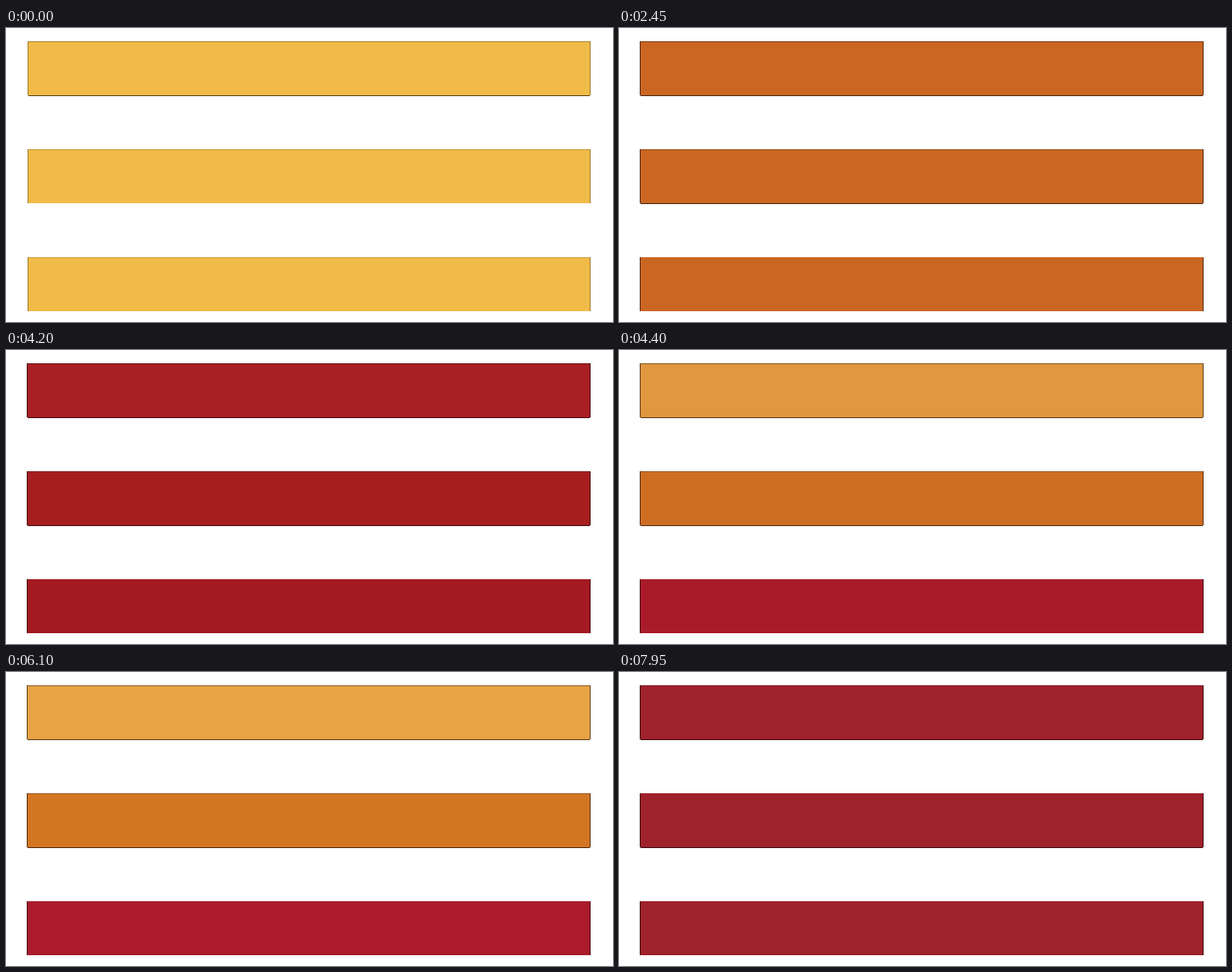
Animation of 731 by 354 pixels, one loop 8000 ms. Source, as an HTML page with a canvas:

```html
<!DOCTYPE html>
<html lang="en">
<head>
<meta charset="utf-8">
<title>Colour bars</title>
<style>
  html, body { margin: 0; width: 100%; height: 100%; overflow: hidden; background: #fff; }
  canvas { display: block; }
</style>
</head>
<body>
<canvas id="stage" width="731" height="354"></canvas>
<script>
const ctx = document.getElementById('stage').getContext('2d');
const LOOP = 8000, STEP = 50, DURATION = 500;
const BAR_TOPS = [16, 146, 276], BAR_HEIGHT = 65;

const yellow = [241, 187, 72];
const orange = [217, 134, 35];
const red = [165, 25, 33];
const crimson = [171, 27, 45];
const wine = [159, 33, 43];
const all = colour => [colour, colour, colour];

// Outline strength: top, side lines, and the bottom line of each bar
const moving = { left: 25, right: 704, top: [0.4, 0.25, 0], sides: 0.6, bottom: [0.65, 0.65, 0] };
const scenes = [
  { colours: all(yellow), look: { left: 26, right: 704, top: [0.3, 0.2, 0.15], sides: 0.35, bottom: [0.65, 0, 0] } },
  { begin: 380, from: 500, to: 800, colours: all(orange),
    look: { left: 26, right: 703, top: [0.2, 0.1, 0.1], sides: 0.25, bottom: [0.65, 0, 0] } },
  { begin: 2240, from: 2350, to: 2700, colours: all(red),
    look: { left: 26, right: 703, top: [0, 0, 0], sides: 0, bottom: [0.6, 0, 0] } },
  { begin: 4090, from: 4200, to: 4600, colours: [yellow, orange, crimson],
    look: { left: 25, right: 703, top: [0.25, 0.15, 0.1], sides: 0.4, bottom: [0.6, 0, 0] } },
  { begin: 5933, from: 6100, to: 6400, colours: all(crimson),
    look: { left: 25, right: 703, top: [0, 0, 0], sides: 0.3, bottom: [0.6, 0, 0] } },
  { begin: 7950, from: 7950, to: 7950, colours: all(wine), look: { ...moving, top: [0.2, 0, 0] } }
];

const cubicInOut = u => u < 0.5 ? 4 * u ** 3 : 1 - 4 * (1 - u) ** 3;
const mix = (a, b, p) => a.map((v, i) => Math.round(v + (b[i] - v) * p));
const rgb = c => `rgb(${c.join(',')})`;

function drawBar(colour, i, look) {
  const { left, right } = look, y = BAR_TOPS[i], width = right - left;
  const line = (x, top, w, h, strength) => {
    if (!strength) return;
    ctx.fillStyle = rgb(mix(colour, [0, 0, 0], strength));
    ctx.fillRect(x, top, w, h);
  };
  ctx.fillStyle = rgb(colour);
  ctx.fillRect(left, y, width, BAR_HEIGHT);
  line(left, y, width, 1, look.top[i]);
  line(left, y, 1, BAR_HEIGHT, look.sides);
  line(right - 1, y, 1, BAR_HEIGHT, look.sides);
  line(left + 1, y + BAR_HEIGHT, width - 2, 1, look.bottom[i]);
}

function draw(now) {
  const t = Math.floor(now % LOOP / STEP) * STEP;
  let n = scenes.length - 1;
  while (n > 0 && t < scenes[n].from) n--;
  const scene = scenes[n], previous = scenes[n - 1];
  const active = n > 0 && t < scene.to;
  const p = active ? cubicInOut((t - scene.begin) / DURATION) : 1;
  ctx.fillStyle = '#fff';
  ctx.fillRect(0, 0, 731, 354);
  scene.colours.forEach((colour, i) =>
    drawBar(active ? mix(previous.colours[i], colour, p) : colour, i, active ? moving : scene.look));
}

let start;
function tick(now) {
  start ??= now;
  draw(now - start);
  requestAnimationFrame(tick);
}
draw(0);
requestAnimationFrame(tick);
</script>
</body>
</html>
```
